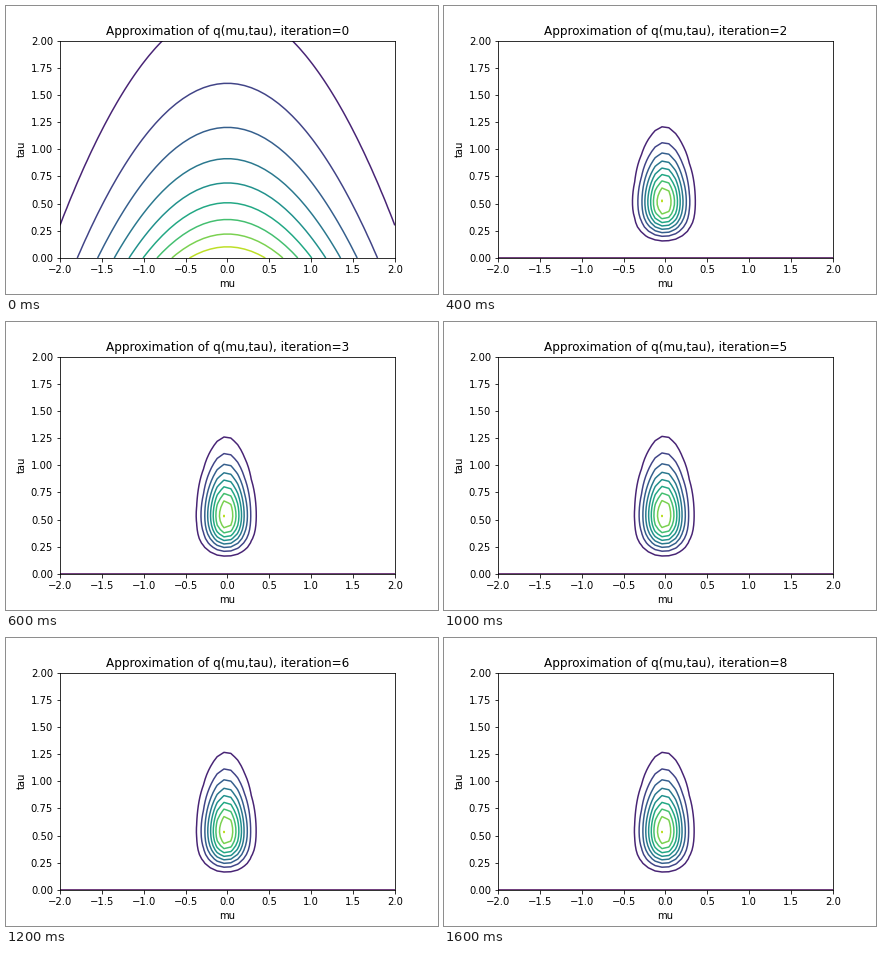
These frames come from a looping animation (432 px wide and 288 px high, 1.8 s). A matplotlib script:

```python
import math

import matplotlib.pyplot as plt
import numpy as np
from matplotlib.animation import FuncAnimation

STEPS = 9
GRID = 50
COUNT = 9          # prior strength plus number of observations
SHAPE = 5.5        # gamma shape after the first update
MEAN = -0.0165     # mean of mu after the first update
SPREAD = 7.475     # part of the rate that comes from the data
GAIN = 4.975       # weight of the variance of mu in the rate

plt.rcParams["font.family"] = "DejaVu Sans"
fig, ax = plt.subplots(figsize=(6, 4), dpi=72, facecolor="white")
fig.subplots_adjust(left=0.125, right=0.9, bottom=0.125, top=0.88)

mu, tau = np.meshgrid(np.linspace(-2, 2, GRID), np.linspace(0, 2, GRID))


def posterior(step):
    """Mean and inverse width of mu, shape and rate of tau."""
    mean, lam, shape, rate = 0.0, 1.0, 1.0, 1.0
    for _ in range(step):
        mean, shape = MEAN, SHAPE
        rate = SPREAD + GAIN / lam
        lam = COUNT * shape / rate
    return mean, lam, shape, rate


def density(mean, lam, shape, rate):
    normal = lam / math.sqrt(2 * math.pi) * np.exp(-0.5 * (lam * (mu - mean)) ** 2)
    gamma = rate ** shape / math.gamma(shape) * tau ** (shape - 1) * np.exp(-rate * tau)
    return normal * gamma


def draw(step):
    ax.clear()
    top = 4.0 if step else 0.4
    ax.contour(mu, tau, density(*posterior(step)),
               levels=np.linspace(0, top, 11), cmap="viridis", linewidths=1.5)
    ax.set(xlim=(-2, 2), ylim=(0, 2), xlabel="mu", ylabel="tau",
           xticks=np.arange(-2, 2.1, 0.5), yticks=np.arange(0, 2.1, 0.25))
    ax.set_title(f"Approximation of q(mu,tau), iteration={step}")
    return []


anim = FuncAnimation(fig, draw, frames=STEPS, init_func=lambda: draw(0),
                     interval=200, repeat=True, repeat_delay=0)
plt.show()
```
